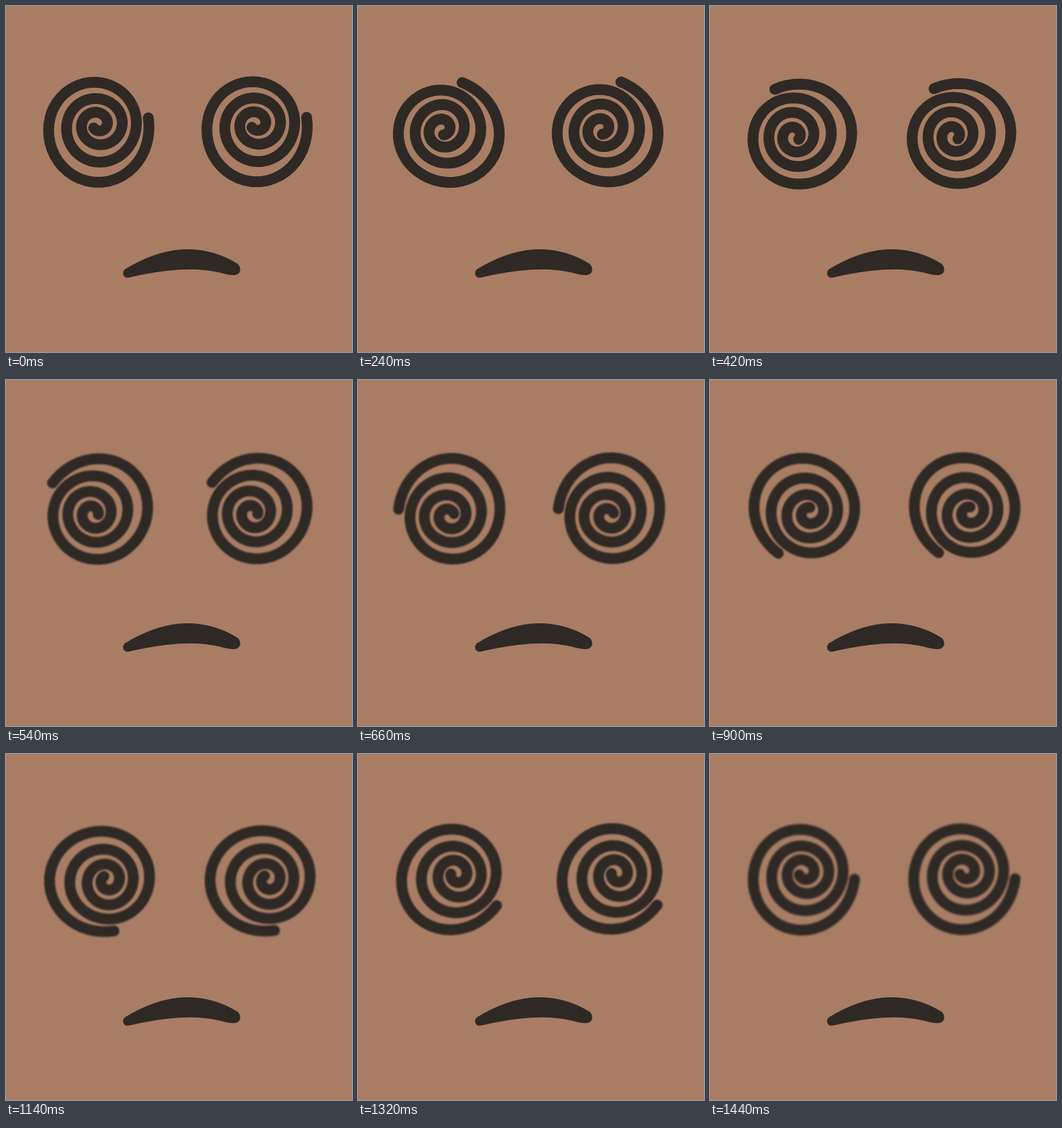
An HTML page that plays this animation: 512 px wide and 512 px high, repeating every 1500 ms.

```html
<!DOCTYPE html>
<html>
<head>
<meta charset="utf-8">
<style>
  html, body { margin: 0; width: 100%; height: 100%; overflow: hidden; background: #a97d64; }
  svg { display: block; width: 100vw; height: 100vh; }
</style>
</head>
<body>
<svg viewBox="0 0 512 512">
  <defs>
    <path id="spiral" fill="none" stroke="#2e2925" stroke-width="16" stroke-linecap="round" stroke-linejoin="round"/>
  </defs>
  <g id="eyes">
    <use href="#spiral"/>
    <use href="#spiral"/>
  </g>
  <path fill="#2e2925" d="M176 389.500 Q225 360 268 360 Q308 360 342 381
    C349 386 348 397 339 398 C331 399 322 396 316 394.500 Q265 382 181 402 C173 403 171 394 176 389.500Z"/>
</svg>
<script>
  const pivot = { x: 137, y: 188.3 };
  const core = { x: 135.5 - pivot.x, y: 175 - pivot.y };
  // Hand-drawn spiral: distance from the core after each quarter turn, tip first
  const radii = [76, 86, 72, 62, 57.5, 56, 45.5, 38, 36.5, 30, 23.5, 17.5, 14.5, 9.5, 7];

  function radiusAt(turn) {
    const i = Math.floor(turn), t = turn - i;
    const at = k => radii[Math.max(0, Math.min(radii.length - 1, k))];
    const a = at(i - 1), b = at(i), c = at(i + 1), d = at(i + 2);
    return b + t / 2 * (c - a + t * (2 * a - 5 * b + 4 * c - d + t * (3 * (b - c) + d - a)));
  }

  const points = [];
  for (let turn = -0.08; turn < 13.6; turn += 0.08) {
    const r = radiusAt(turn), angle = turn * Math.PI / 2;
    points.push([core.x + r * Math.cos(angle), core.y + r * Math.sin(angle)]);
  }
  document.getElementById('spiral').setAttribute('d', 'M' + points.join('L'));

  const eyes = document.getElementById('eyes');
  const [left, right] = eyes.children;

  function place(eye, x, y, angle) {
    eye.setAttribute('transform', `translate(${x} ${y}) rotate(${angle})`);
  }

  function draw(now) {
    const tick = Math.floor(now % 1500 / 60);
    const step = tick < 18 ? tick : tick - 1; // one tick is held
    const angle = -15 * step;
    place(left, pivot.x, pivot.y, angle);
    place(right, pivot.x + 234.2 + 0.2 * Math.min(step, 17), pivot.y - 0.8, angle);
    // each turn softens the edges a little more
    eyes.style.filter = step ? `blur(${0.28 * Math.sqrt(step)}px)` : 'none';
    requestAnimationFrame(draw);
  }
  requestAnimationFrame(draw);
</script>
</body>
</html>
```
